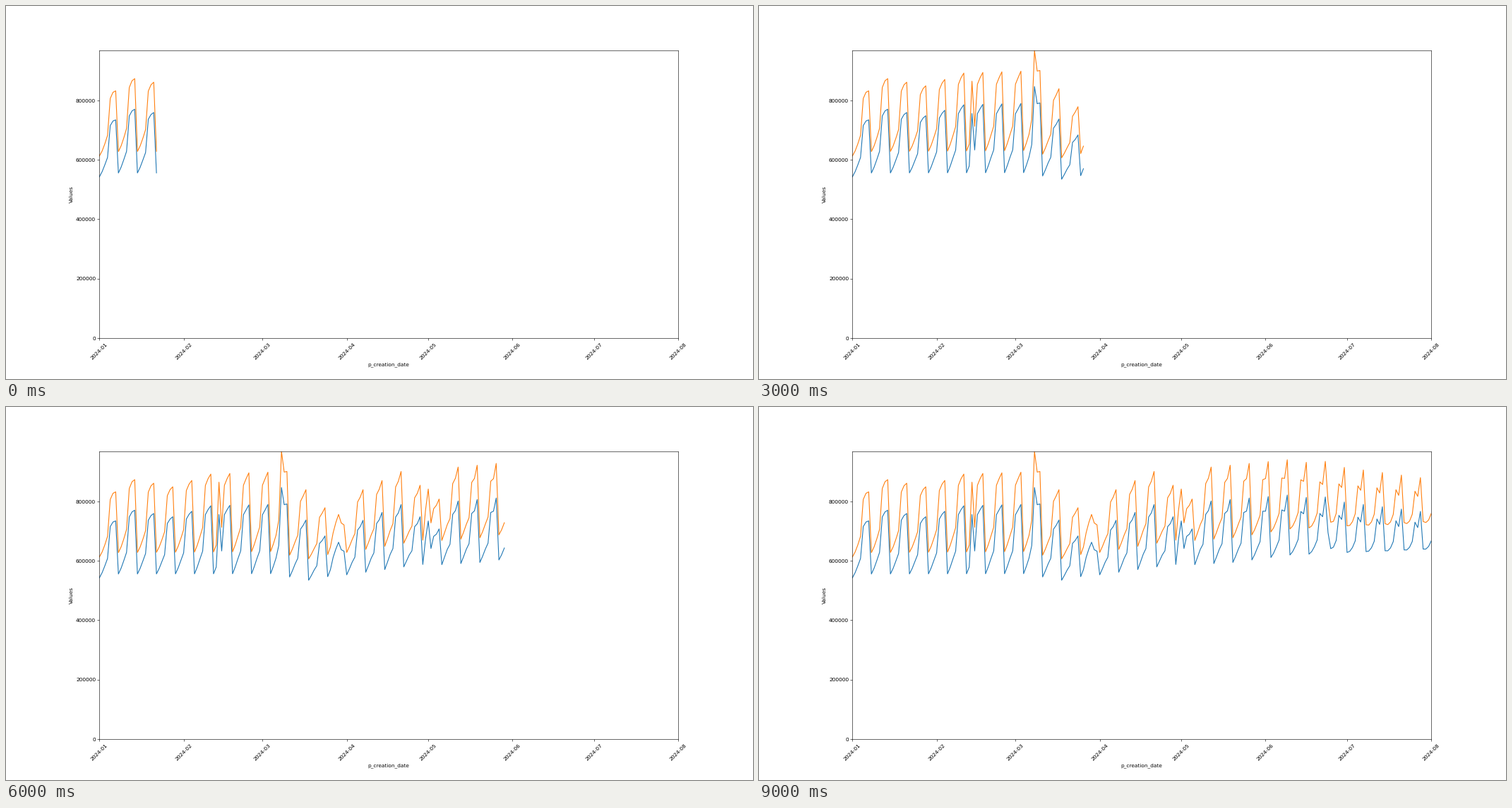
A matplotlib script for the animation above (10 s loop, 1058 by 529 pixels).

```python
import numpy as np
import matplotlib.pyplot as plt
from matplotlib.animation import FuncAnimation

DAYS = 214
FRAMES = 10
TOP = 968000

plt.rcParams["text.hinting"] = "none"

# Share of the weekly rise reached from Monday to Sunday, at three points in time
SHAPE_WEEKS = [0, 18, 28]
SHAPES = np.array([
    [0, 0.09, 0.21, 0.34, 0.90, 0.98, 1],
    [0, 0.12, 0.24, 0.32, 0.79, 0.85, 1],
    [0, 0.00, 0.07, 0.22, 0.72, 0.58, 1],
])

# Holiday peaks: day, height, spread in days
PEAKS = [(44, 149, 0.25), (67, 92, 0.55), (87, 68, 1.2),
         (120.7, 135, 0.65), (175, 70, 0.5)]


def holiday_peaks():
    return sum(h * np.exp(-((days - d) / s) ** 2 / 2) for d, h, s in PEAKS)


def weekly_wave():
    week = days // 7
    low = np.interp(week, [0, 1, 9, 11, 16, 20, 23, 30],
                    [543, 556, 557, 535, 580, 595, 620, 640])
    high = np.interp(week, [0, 1, 3, 5, 9, 12, 13, 15, 17, 18, 22, 29],
                     [735, 771, 749, 786, 792, 630, 737, 790, 708, 802, 822, 767])
    share = [np.interp(w, SHAPE_WEEKS, SHAPES[:, d])
             for w, d in zip(week, days % 7)]
    return low + (high - low) * share


days = np.arange(DAYS)
peaks = holiday_peaks()
lower = weekly_wave() + peaks
ratio = (1.127 + 0.006 * np.cos(2 * np.pi * (days - 5.7) / 7)
         + 0.016 * days / (DAYS - 1))
upper = lower * ratio + 0.1 * peaks

fig, ax = plt.subplots(figsize=(20, 10), dpi=52.9)
lower_line, = ax.plot([], [], color="tab:blue")
upper_line, = ax.plot([], [], color="tab:orange")

ax.set_xlim(0, DAYS - 1)
ax.set_ylim(0, TOP)
months = np.arange("2024-01", "2024-09", dtype="datetime64[M]")
starts = (months.astype("datetime64[D]") - np.datetime64("2024-01-01")).astype(int)
ax.set_xticks(starts, months.astype(str), rotation=45)
ax.set_yticks(range(0, 800001, 200000))
ax.set_xlabel("p_creation_date")
ax.set_ylabel("Values")


def draw(frame):
    count = (DAYS - 1) * (frame + 1) // FRAMES + 1
    lower_line.set_data(days[:count], 1000 * lower[:count])
    upper_line.set_data(days[:count], 1000 * upper[:count])
    return lower_line, upper_line


anim = FuncAnimation(fig, draw, frames=FRAMES, interval=1000, repeat=True)
plt.show()
```
